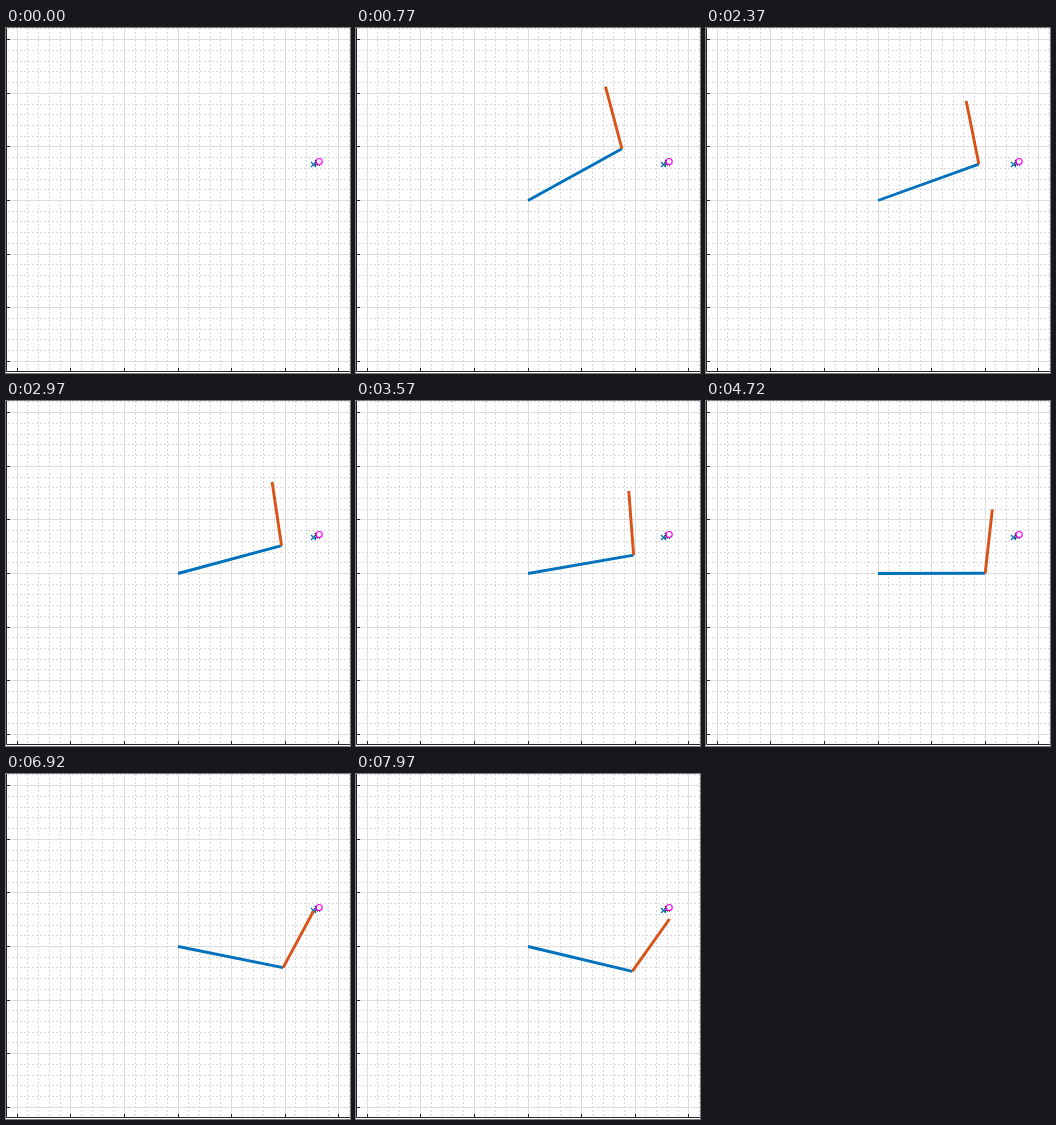
Animation of 344 by 345 pixels, one loop 8000 ms. Source, as an HTML page with a canvas:

```html
<!DOCTYPE html>
<html lang="en">
<head>
<meta charset="utf-8">
<title>Two-link arm</title>
<style>
  html, body { margin: 0; width: 100%; height: 100%; overflow: hidden; background: #fff; }
  canvas { display: block; }
</style>
</head>
<body>
<canvas id="stage" width="344" height="345"></canvas>
<script>
const ctx = document.getElementById('stage').getContext('2d');
const LOOP = 8000, FIRST = 20, STEP = 50;
const UNIT = 53.6, BASE = { x: 172.03, y: 172.5 };
const UPPER = 2 * UNIT, FORE = 1.2 * UNIT;
const BLUE = '#0072bd', ORANGE = '#d95319', MAGENTA = '#ff00ff', INK = '#262626';

// Time in ms and height of the tip, which slides along a straight line.
const KEYS = [[20, 56.8], [820, 58.9], [1670, 65.8], [2520, 74.9], [3570, 90],
  [4720, 108.3], [5870, 127.3], [6770, 136], [7620, 140.5], [7970, 145]];

function slope(i) {
  const [t0, y0] = KEYS[Math.max(i - 1, 0)];
  const [t1, y1] = KEYS[Math.min(i + 1, KEYS.length - 1)];
  return (y1 - y0) / (t1 - t0);
}

function tipHeight(t) {
  let i = 0;
  while (i < KEYS.length - 2 && t > KEYS[i + 1][0]) i++;
  const [t0, y0] = KEYS[i], [t1, y1] = KEYS[i + 1];
  const span = t1 - t0, u = (t - t0) / span, v = 1 - u;
  const startSlope = i ? slope(i) : 0;
  return y0 * v * v * (1 + 2 * u) + y1 * u * u * (3 - 2 * u)
    + span * u * v * (startSlope * v - slope(i + 1) * u);
}

function stroke(color, width, points, dash = []) {
  ctx.strokeStyle = color;
  ctx.lineWidth = width;
  ctx.setLineDash(dash);
  ctx.beginPath();
  points.forEach(([x, y]) => ctx.lineTo(x, y));
  ctx.stroke();
}

function drawGrid() {
  const pixel = (origin, n) => Math.floor(origin + n * UNIT / 5) + 0.5;
  const lines = (color, major, dash) => {
    for (let n = -16; n <= 16; n++) {
      if ((n % 5 === 0) !== major) continue;
      const x = pixel(BASE.x, n), y = pixel(BASE.y, n);
      stroke(color, 1, [[x, 0], [x, 343]], dash);
      if (y < 343) stroke(color, 1, [[344, y], [0, y]], dash);
    }
  };
  lines('#d9d9d9', false, [2, 2]);
  lines('#dcdcdc', true);
  stroke(INK, 1, [[0.5, 0], [0.5, 343.5], [344, 343.5]]);
  for (let n = -15; n <= 15; n += 5) {
    const x = pixel(BASE.x, n), y = pixel(BASE.y, n);
    stroke(INK, 1, [[x, 343], [x, 340]]);
    stroke(INK, 1, [[0, y], [4, y]]);
  }
}

function drawMarkers() {
  stroke(BLUE, 1.2, [[305, 134], [310, 139]]);
  stroke(BLUE, 1.2, [[305, 139], [310, 134]]);
  stroke(INK, 1, [[308.5, 134.5], [314, 134.5]]);
  stroke(INK, 1.2, [[309, 132], [314, 137.5]]);
  stroke(INK, 1.2, [[309, 137.5], [314, 132]]);
  stroke(INK, 1, [[311.5, 131.5], [311.5, 137.5]]);
  ctx.fillStyle = '#fff';
  ctx.strokeStyle = MAGENTA;
  ctx.lineWidth = 1.2;
  ctx.beginPath();
  ctx.arc(313.2, 133.5, 3, 0, 2 * Math.PI);
  ctx.fill();
  ctx.stroke();
}

function drawArm(t) {
  const tipY = tipHeight(t), tipX = 253.5 + 0.741 * (tipY - 64);
  const dx = tipX - BASE.x, dy = tipY - BASE.y, reach = Math.hypot(dx, dy);
  const bend = Math.acos((reach ** 2 + UPPER ** 2 - FORE ** 2) / (2 * reach * UPPER));
  const angle = Math.atan2(dy, dx) + bend;
  const elbow = [BASE.x + UPPER * Math.cos(angle), BASE.y + UPPER * Math.sin(angle)];
  stroke(BLUE, 2.9, [[BASE.x, BASE.y], elbow]);
  stroke(ORANGE, 2.9, [elbow, [tipX, tipY]]);
}

function draw() {
  const t = performance.now() % LOOP;
  ctx.fillStyle = '#fff';
  ctx.fillRect(0, 0, 344, 345);
  drawGrid();
  drawMarkers();
  if (t >= FIRST) drawArm(FIRST + STEP * Math.floor((t - FIRST) / STEP));
  requestAnimationFrame(draw);
}
draw();
</script>
</body>
</html>
```
